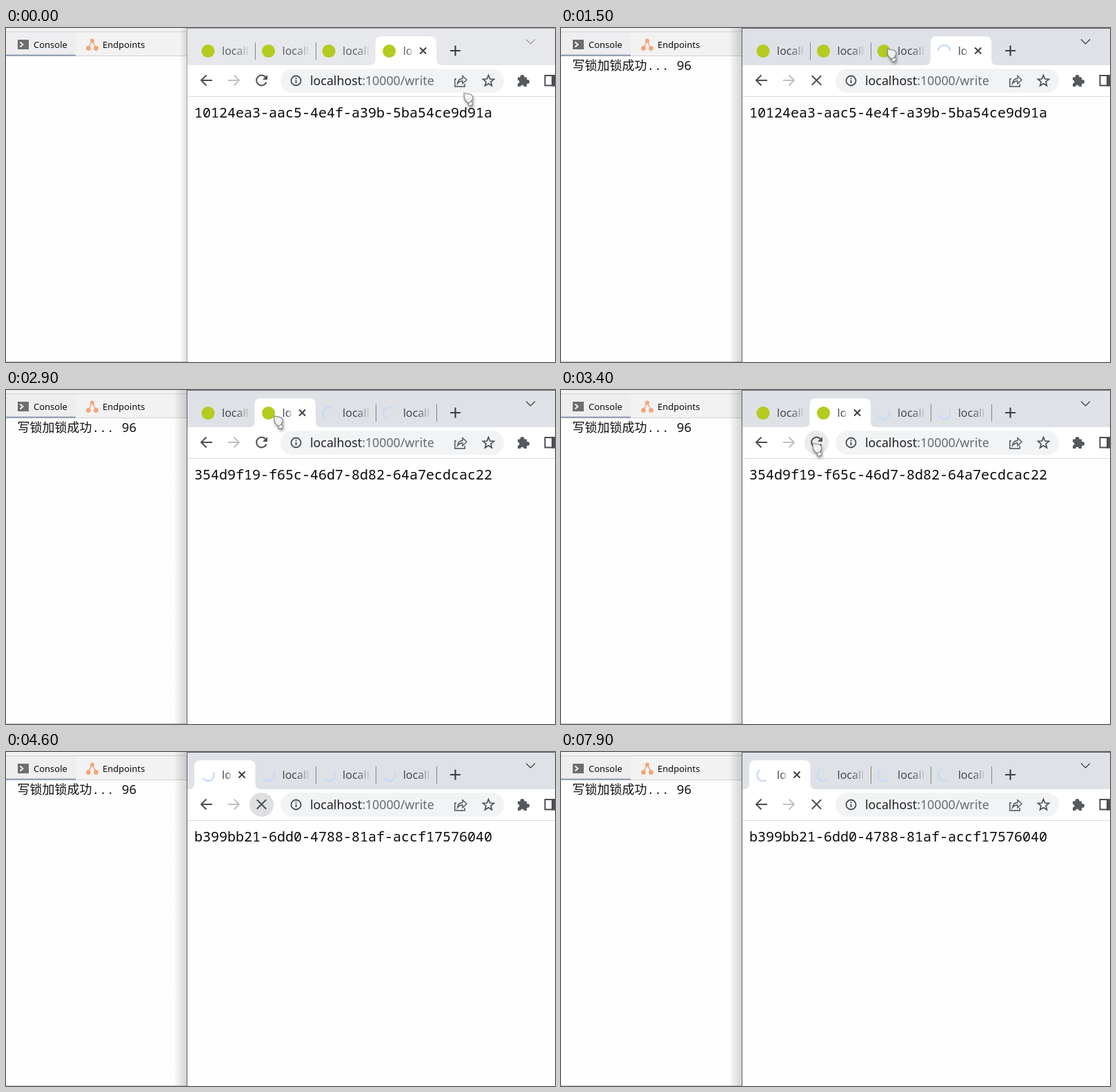
An HTML page with a canvas for the animation above (8 s loop, 796x485 px).

```html
<!DOCTYPE html>
<html lang="en">
<head>
<meta charset="utf-8">
<title>Write lock demo</title>
<style>
  html, body { margin: 0; width: 100%; height: 100%; overflow: hidden; background: #fff; }
  canvas { display: block; }
</style>
</head>
<body>
<canvas id="stage" width="796" height="485"></canvas>
<script>
const ctx = document.getElementById('stage').getContext('2d');
const W = 796, H = 485, LOOP = 8000, STEP = 100;
const SANS = '"Noto Sans", "Open Sans", sans-serif';
const MONO = '"Noto Sans Mono", "DejaVu Sans Mono", monospace';
const CJK = '"Noto Sans CJK SC", "Noto Sans CJK", sans-serif';

const TAB_X = 273, TAB_PITCH = 87.55, TAB_W = 88.5;
const pages = [
  'b399bb21-6dd0-4788-81af-accf17576040',
  '354d9f19-f65c-46d7-8d82-64a7ecdcac22',
  'f00fb269-9118-4a18-b18c-251505f899df',
  '10124ea3-aac5-4e4f-a39b-5ba54ce9d91a'
];
const reloadAt = [4500, 3500, 2300, 1100];
const selectAt = [3900, 2800, 1600, 0];
const FOCUS_AT = 1100, LOG_AT = 1200, HIDE_AT = 4500, HOVER_END = 4800;

// Pointer tip: time, x, y
const pointer = [
  [0, 663, 94], [100, 420, 92], [200, 420, 92], [600, 363, 68], [1200, 363, 68],
  [1500, 472, 30], [1700, 472, 30], [2100, 351, 70], [2200, 348, 70],
  [2300, 363, 72], [2400, 363, 72], [2700, 392, 30], [2800, 392, 30],
  [3200, 364, 77], [3500, 364, 77], [3800, 312, 30], [3900, 312, 30],
  [4300, 364, 75], [4500, 364, 75]
];

function pointerAt(t) {
  for (let i = 1; i < pointer.length; i++) {
    const [t0, x0, y0] = pointer[i - 1], [t1, x1, y1] = pointer[i];
    if (t > t1) continue;
    const k = (t - t0) / (t1 - t0), e = k * k * (3 - 2 * k);
    return [x0 + (x1 - x0) * e, y0 + (y1 - y0) * e];
  }
  return pointer[pointer.length - 1].slice(1);
}

function rect(x, y, w, h, color) {
  ctx.fillStyle = color;
  ctx.fillRect(x, y, w, h);
}

function text(str, x, y, font, color) {
  ctx.font = font;
  ctx.fillStyle = color;
  ctx.fillText(str, x, y);
}

function disc(x, y, r, color) {
  ctx.fillStyle = color;
  ctx.beginPath();
  ctx.arc(x, y, r, 0, Math.PI * 2);
  ctx.fill();
}

function ring(x, y, r, color, width, from = 0, to = Math.PI * 2) {
  ctx.strokeStyle = color;
  ctx.lineWidth = width;
  ctx.beginPath();
  ctx.arc(x, y, r, from, to);
  ctx.stroke();
}

function stroke(d, color, width) {
  ctx.strokeStyle = color;
  ctx.lineWidth = width;
  ctx.stroke(new Path2D(d));
}

function fill(d, color) {
  ctx.fillStyle = color;
  ctx.fill(new Path2D(d));
}

function cross(x, y, r, color, width) {
  stroke(`M${x - r} ${y - r}L${x + r} ${y + r}M${x + r} ${y - r}L${x - r} ${y + r}`, color, width);
}

function star(x, y, outer, inner) {
  ctx.beginPath();
  for (let i = 0; i < 10; i++) {
    const a = i * Math.PI / 5 - Math.PI / 2, r = i % 2 ? inner : outer;
    ctx.lineTo(x + Math.cos(a) * r, y + Math.sin(a) * r);
  }
  ctx.closePath();
  ctx.strokeStyle = '#4b4f53';
  ctx.lineWidth = 1.7;
  ctx.stroke();
}

function drawConsole(t, focused) {
  rect(0, 0, W, H, '#fefefe');
  rect(0, 0, 262, 40, '#f2f2f2');
  rect(0, 5, 262, 1, '#d2d2d2');
  rect(0, 6, 101, 34, '#eeeef0');
  rect(0, 40, 262, 1, '#d0d0d0');
  rect(0, 38.5, 101, 2.5, '#98a3b5');
  rect(0, 484, 262, 1, '#c4c4c4');

  rect(17, 17, 16, 14, '#6e6e6e');
  stroke('M20.5 20.5L24.5 24L20.5 27.5', '#fff', 1.8);
  text('Console', 40, 29, '13px ' + SANS, '#0c0c0c');
  stroke('M119.5 29L125 18.5L130.5 29', '#f3a67a', 1.6);
  disc(125, 18.5, 3, '#f3a67a');
  disc(119.5, 29.5, 3.4, '#f3a67a');
  disc(130.5, 29.5, 3.4, '#f3a67a');
  text('Endpoints', 140, 29, '13px ' + SANS, '#0c0c0c');

  if (t >= LOG_AT) {
    text('写锁加锁成功', 16.5, 61, '300 18px ' + CJK, '#111');
    text('... 96', 124.5, 61, '18px ' + MONO, '#111');
  }

  const start = focused ? 243 : 252;
  const shade = ctx.createLinearGradient(start, 0, 262, 0);
  shade.addColorStop(0, 'rgba(0,0,0,0)');
  shade.addColorStop(1, focused ? 'rgba(0,0,0,.17)' : 'rgba(0,0,0,.12)');
  rect(start, 0, 262 - start, H, shade);
}

function drawTab(i, t, active) {
  const x = TAB_X + i * TAB_PITCH, shift = i * TAB_PITCH;
  if (i === active) {
    const r = x + TAB_W;
    fill(`M${x - 8} 54Q${x} 54 ${x} 46V21Q${x} 12 ${x + 9} 12H${r - 9}Q${r} 12 ${r} 21V46Q${r} 54 ${r + 8} 54Z`, '#fff');
    cross(342 + shift, 33, 4.5, '#3c4043', 2);
  }
  if (t >= reloadAt[i]) {
    // Half-circle arc turning anticlockwise, once every 1200 ms
    const mid = Math.PI / 3 - (t - 1000) / 1200 * Math.PI * 2;
    ring(293 + shift, 33.5, 8.7, '#c6daf8', 2.3, mid - Math.PI / 2, mid + Math.PI / 2);
  } else {
    disc(293 + shift, 33.5, 9.5, '#b4cb1f');
  }
  const left = 313 + shift, width = i === active ? 14 : 38;
  const fade = ctx.createLinearGradient(left, 0, left + width, 0);
  const dark = t >= FOCUS_AT ? '70,74,78' : '95,99,104';
  fade.addColorStop(0, `rgba(${dark},1)`);
  fade.addColorStop(.55, `rgba(${dark},1)`);
  fade.addColorStop(1, `rgba(${dark},.15)`);
  ctx.save();
  ctx.beginPath();
  ctx.rect(left, 20, width, 28);
  ctx.clip();
  text('localhost', left, 39, '16px ' + SANS, fade);
  ctx.restore();
}

function drawTabs(t, focused, active) {
  rect(263, 1, W - 263, 53, focused ? '#dee1e6' : '#e7e8ec');
  for (let i = 0; i < 4; i++) {
    if (i !== active && i + 1 !== active) {
      rect(Math.round(361 + i * TAB_PITCH), 21, 1, 25, '#7f8388');
    }
    if (i !== active) drawTab(i, t, active);
  }
  drawTab(active, t, active);
  stroke('M651.5 25.5V40.5M644 33H659', '#3c4043', 2.2);
  stroke('M754 16.5L760.5 23L767 16.5', focused ? '#333' : '#9b9b9f', 1.1);
}

function drawToolbar(hover, loading) {
  const ink = '#4b4f53';
  rect(263, 54, W - 263, 45, '#fff');
  rect(263, 99, W - 263, 1, '#dadce0');
  stroke('M299 76H283.5M290.5 68.5L283 76L290.5 83.5', ink, 2);
  stroke('M322 76H337.5M330.5 68.5L338 76L330.5 83.5', '#bdc1c6', 2);

  if (hover) disc(370.5, 76.5, 17.5, loading ? '#dedfe1' : '#ebebed');
  if (loading) {
    cross(370.5, 76, 6.7, ink, 2);
  } else {
    ring(370.5, 76, 7.4, ink, 2, .35, Math.PI * 1.78);
    fill('M379 68V75H372Z', ink);
  }

  ctx.fillStyle = '#f1f3f4';
  ctx.beginPath();
  ctx.roundRect(398, 59, 324, 35, 17.5);
  ctx.fill();
  ring(420.5, 76.5, 7, ink, 1.8);
  rect(419.6, 75.5, 1.9, 4.7, ink);
  rect(419.6, 72.3, 1.9, 1.9, ink);
  const font = '17.8px ' + SANS;
  text('localhost', 441, 83, font, '#202124');
  text(':10000/write', 441 + ctx.measureText('localhost').width, 83, font, '#666a6f');

  stroke('M653 74H650.8V85H665.2V81', ink, 1.4);
  stroke('M654.5 81Q655.5 73.5 662 73.5V69.5L668 75.3L662 81V77Q657 77 654.5 81Z', ink, 1.3);
  star(699.5, 77, 8.4, 3.7);

  rect(742, 71.5, 13, 13.5, '#55595d');
  disc(748.5, 71, 3, '#55595d');
  disc(756, 78, 3, '#55595d');
  disc(742, 78.2, 2.4, '#fff');
  disc(748.5, 85.2, 2.4, '#fff');
  stroke('M796 69H781.5V83.5H796', ink, 2);
  rect(791, 68, 5, 16.5, ink);
}

function drawPointer(x, y) {
  ctx.save();
  ctx.translate(x, y);
  const shape = 'M1 .5L9.5 2Q14 3.5 14 8L11.5 12.5Q15 15 14 17Q11 20 7.5 18.5L7.5 15Q2.5 12 1.5 8Z';
  ctx.shadowColor = 'rgba(0,0,0,.45)';
  ctx.shadowBlur = 4;
  ctx.shadowOffsetX = 1;
  ctx.shadowOffsetY = 3;
  fill(shape, '#f0f0f0');
  ctx.shadowColor = 'transparent';
  stroke(shape, '#858585', 1.2);
  stroke('M7.5 15L11.5 12.5', '#858585', 1.1);
  ctx.restore();
}

function draw(t) {
  const focused = t >= FOCUS_AT;
  const active = selectAt.findIndex(at => t >= at);
  const [px, py] = pointerAt(t);
  const hover = t < HOVER_END && Math.hypot(px - 370.5, py - 76.5) < 18;

  drawConsole(t, focused);
  rect(263, 0, W - 263, H, '#fefefe');
  drawTabs(t, focused, active);
  drawToolbar(hover, t >= reloadAt[active]);
  text(pages[active], 273, 130, '20px ' + MONO, '#0a0a0a');

  const edge = focused ? '#5e6064' : '#9c9da0';
  rect(262, 0, 1, H, edge);
  rect(262, 0, W - 262, 1, edge);
  if (t < HIDE_AT) drawPointer(px, py);
}

const begin = performance.now();
function frame() {
  const t = (performance.now() - begin) % LOOP;
  draw(Math.floor(t / STEP) * STEP);
  requestAnimationFrame(frame);
}
frame();
</script>
</body>
</html>
```
